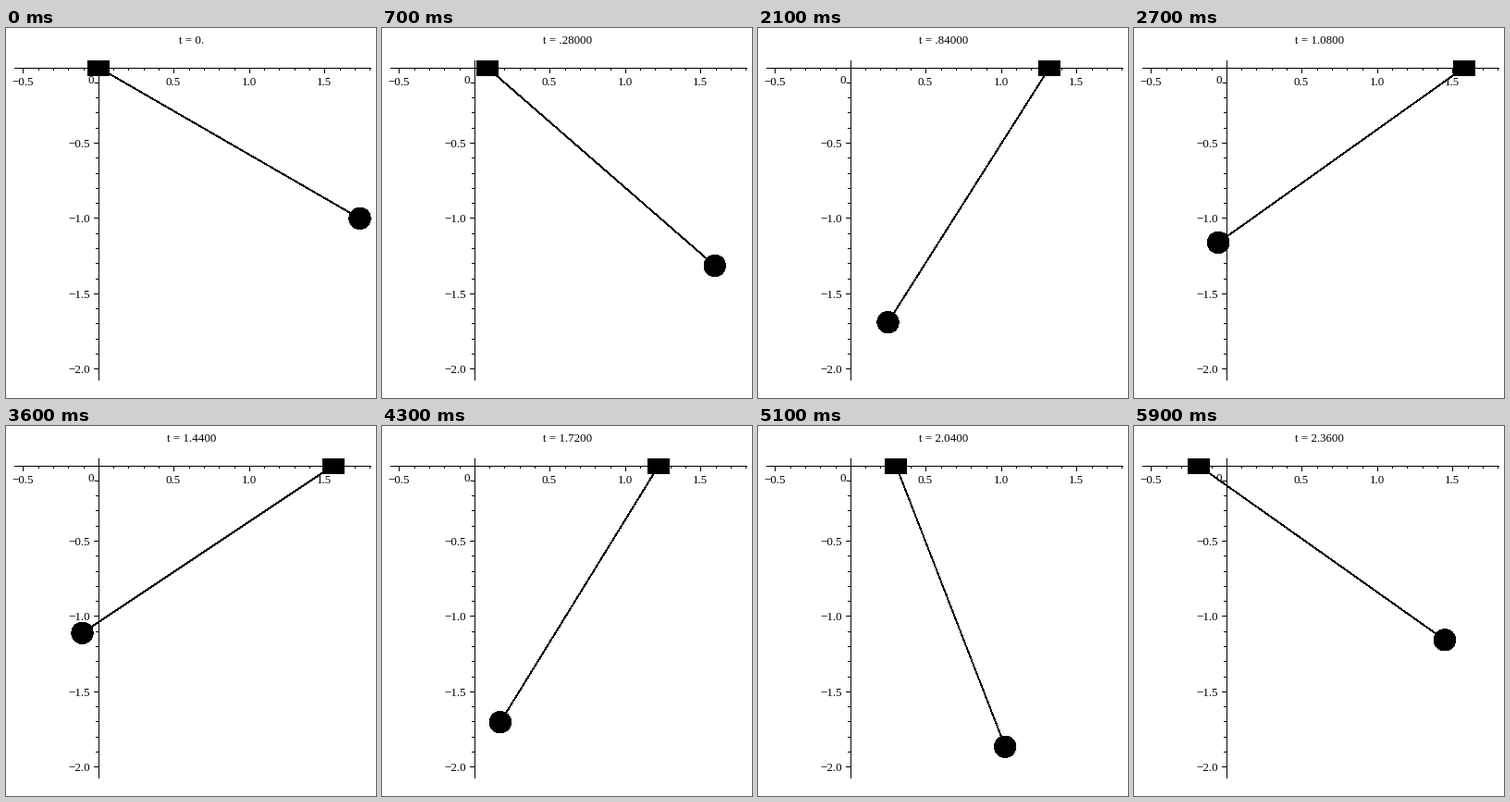
A matplotlib script for the animation above (6 s loop, 400x400 px).

```python
import numpy as np
import matplotlib.pyplot as plt
from matplotlib.animation import FuncAnimation
from matplotlib.patches import Circle, Rectangle

STEPS, DT = 60, 0.04
G, LENGTH, DRIFT = 9.8, 2.0, -0.1
START = np.pi / 3
OX, OY, UNIT = 100.4, 43, 162.9
CART_W, CART_H, CART_TOP = 24, 17, 35
# Hard-edged fills cover every touched pixel, so sizes are a bit under nominal.
RADIUS, ROD = 11.6, 0.7

plt.rcParams["font.family"] = "Liberation Serif"
fig = plt.figure(figsize=(4, 4), dpi=100, facecolor="white")
ax = fig.add_axes([0, 0, 1, 1])
ax.set(xlim=(0, 400), ylim=(400, 0))
ax.axis("off")


def px(x):
    return OX + UNIT * x


def py(y):
    return OY - UNIT * y


def solid(patch, z=1):
    """Add a black patch with hard edges."""
    patch.set(color="black", lw=0, antialiased=False, zorder=z)
    return ax.add_patch(patch)


def box(x, y, w, h, z=1):
    return solid(Rectangle((x, y), w, h), z)


def label(x, y, text, ha="center"):
    return ax.text(x, y, text, ha=ha, va="baseline", fontsize=13 * 0.72,
                   color="black", zorder=2)


def number(value):
    return f"{value:.1f}".replace("-", "\u2212")


def draw_axes():
    col, row = int(OX), int(OY)
    box(9, row, 386, 1)
    box(col, 35, 1, 346)
    for k in range(-5, 19):
        if k == 0:
            continue
        x, major = int(px(k / 10)), k % 5 == 0
        box(x, row, 1, 6 if major else 3)
        if major:
            label(x, 62, number(k / 10))
    for k in range(1, 21):
        y, major = int(py(-k / 10)), k % 5 == 0
        size = 5 if major else 3
        box(col - size, y, size, 1)
        if major:
            label(91, y + 5, number(-k / 10), "right")
    label(98, 60, "0.", "right")


def accel(angle, speed):
    s, c = np.sin(angle), np.cos(angle)
    return -s * (G + c * speed ** 2) / (1 + s * s)


def swing(sub=10):
    """Pendulum angle at each step, cart and bob of equal mass (RK4)."""
    def rate(v):
        return np.array([v[1], accel(*v)])

    h = DT / sub
    state = np.array([START, 0.0])
    angles = []
    for _ in range(STEPS):
        angles.append(state[0])
        for _ in range(sub):
            a = rate(state)
            b = rate(state + h / 2 * a)
            c = rate(state + h / 2 * b)
            d = rate(state + h * c)
            state = state + h / 6 * (a + 2 * b + 2 * c + d)
    return np.array(angles)


def clock(t):
    """Five significant digits without a leading zero."""
    if t == 0:
        return "0."
    if t < 0.1:
        return f"{t * 10:.5f}"[1:] + "e-1"
    if t < 1:
        return f"{t:.5f}"[1:]
    return f"{t:.4f}"


draw_axes()
angles = swing()
title = label(200.5, 17, "")
rod, = ax.plot([], [], color="black", lw=ROD * 0.72, antialiased=False,
               solid_capstyle="butt", zorder=3)
cart = box(0, CART_TOP, CART_W, CART_H, z=4)
bob = solid(Circle((0, 0), RADIUS), z=4)


def draw(i):
    t, angle = i * DT, angles[i]
    x = DRIFT * t + np.sin(START) - np.sin(angle)
    cx = px(x)
    bx, by = px(x + LENGTH * np.sin(angle)), py(-LENGTH * np.cos(angle))
    title.set_text(f"t = {clock(t)}")
    rod.set_data([cx, bx], [OY, by])
    cart.set_x(cx - CART_W / 2)
    bob.center = bx, by
    return title, rod, cart, bob


anim = FuncAnimation(fig, draw, frames=STEPS, interval=100, repeat=True)
plt.show()
```
